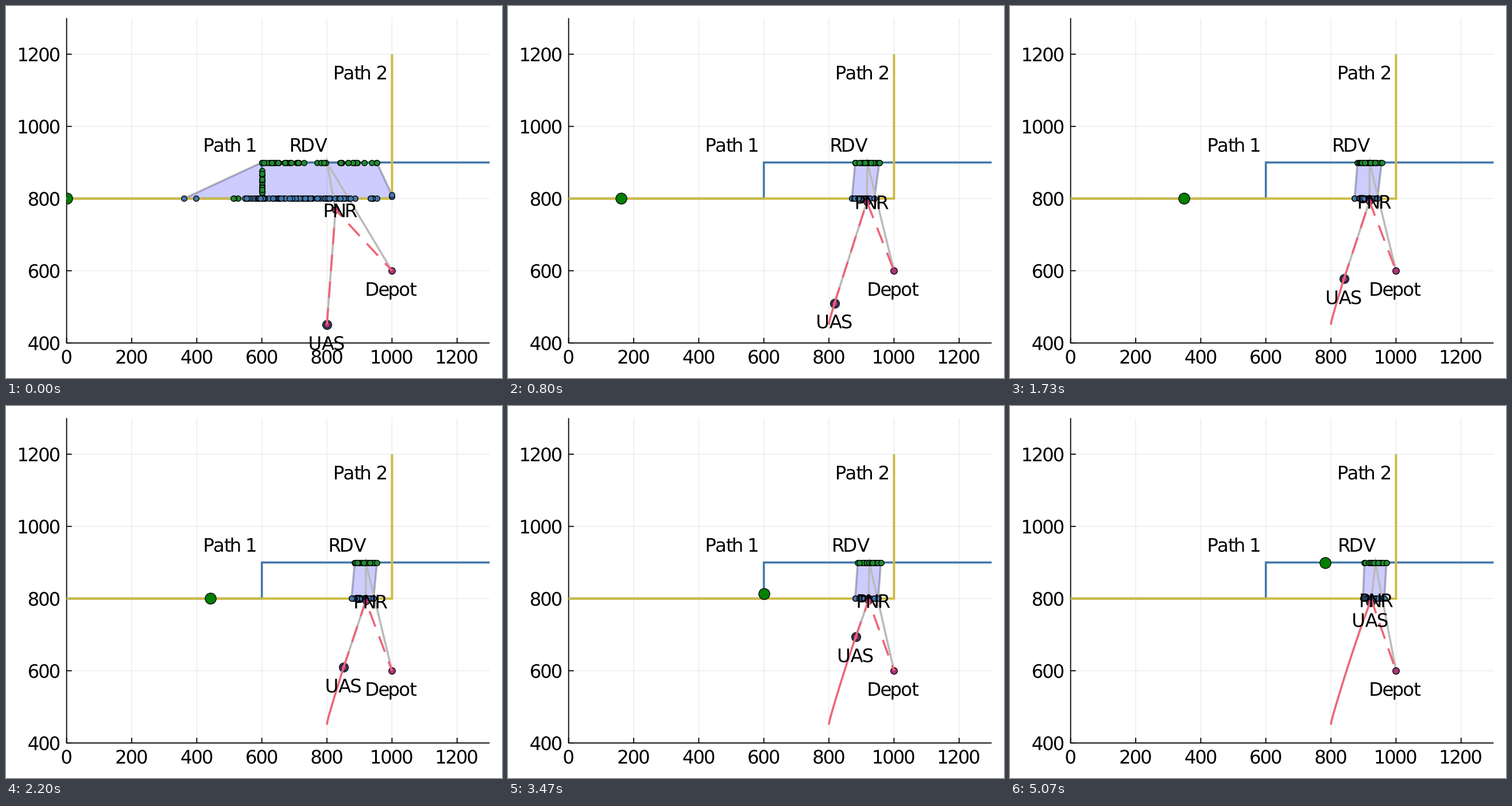
Write a matplotlib script that moves like this. It is 864x648 px and loops after 5.14 s.

```python
import numpy as np
import matplotlib.pyplot as plt
from matplotlib.animation import FuncAnimation
from matplotlib.patches import PathPatch, Polygon, Rectangle
from matplotlib.path import Path
from matplotlib.textpath import TextPath
from matplotlib.transforms import Affine2D

W, H, DPI = 864, 648, 100
PX = 72 / DPI
LEFT, RIGHT, TOP, BOTTOM = 105.6, 842.4, 21.1, 587
EM = 32.4
CAP = 0.729 * EM
BLUE, RED, GREEN = "#4477aa", "#ee6677", "#228833"
YELLOW, PURPLE, GRAY = "#ccbb44", "#aa3377", "#bbbbbb"

LOOP, TICK, STEPS = 5140, 20, 77
STARTS = np.round(np.arange(STEPS) * 20 / 3) * 10


def px(x, y):
    """Plot units to stage pixels."""
    return LEFT + np.asarray(x) * 0.5668, BOTTOM - (np.asarray(y) - 400) * 0.62885


fig = plt.figure(figsize=(W / DPI, H / DPI), dpi=DPI, facecolor="white")
ax = fig.add_axes([0, 0, 1, 1])
ax.set(xlim=(0, W), ylim=(H, 0))
ax.axis("off")


def line(x, y, color, width, z, **kw):
    kw = {"solid_capstyle": "butt", "solid_joinstyle": "miter"} | kw
    return ax.plot(x, y, color=color, lw=width * PX, zorder=z, snap=False, **kw)[0]


def dots(x, y, color, size, z):
    return ax.plot(x, y, "o", color=color, ms=size * PX, mec="black",
                   mew=1.3 * PX, zorder=z, snap=False)[0]


# --- text: each glyph starts at the pen, without its left bearing ---
def glyph(s):
    return TextPath((0, 0), s, size=EM, prop={"family": "DejaVu Sans"})


def right(s):
    return glyph(s).get_extents().x1


def shape(s):
    pen, parts, end = 0, [], 0
    bar = right("|")
    for c in s:
        step = right(c + "|") - bar
        if c != " ":
            g = glyph(c)
            box = g.get_extents()
            pen -= box.x0
            parts.append(Path(g.vertices + [pen, 0], g.codes))
            end = pen + box.x1
        pen += step
    path = Path.make_compound_path(*parts)
    return Path(path.vertices * [1, -1] + [0, CAP / 2], path.codes), end


class Label:
    def __init__(self, s, x=0, y=0, align=0.5):
        path, self.width = shape(s)
        self.align = align
        self.patch = ax.add_patch(PathPatch(path, fc="black", lw=0, zorder=20))
        self.move(x, y)

    def move(self, x, y):
        shift = Affine2D().translate(x - self.align * self.width, y)
        self.patch.set_transform(shift + ax.transData)


# --- axes ---
for v in range(0, 1201, 200):
    x, _ = px(v, 400)
    if v:
        line([x, x], [TOP, BOTTOM], "#e8e8e8", 1.2, 0)
    line([x, x], [BOTTOM, BOTTOM - 9], "black", 1.8, 1)
    Label(str(v), x, 611)
for v in range(400, 1201, 200):
    _, y = px(0, v)
    if v > 400:
        line([LEFT, RIGHT], [y, y], "#e8e8e8", 1.2, 0)
    line([LEFT, LEFT + 9], [y, y], "black", 1.8, 1)
    Label(str(v), 93, y + 0.5, 1)
line([LEFT, LEFT, RIGHT], [TOP, BOTTOM, BOTTOM], "black", 1.8, 1)

# --- fixed parts ---
line(*px([0, 600, 600, 1300], [800, 800, 900, 900]), BLUE, 3.6, 4)
line(*px([0, 1000, 1000], [800, 800, 1200]), YELLOW, 4, 5)
Label("Path 1", 390.5, 242)
Label("Path 2", 617.5, 116)
Label("Depot", 671.8, 493)
DEPOT = px(1000, 600)
dots(*DEPOT, PURPLE, 11.5, 9)

# --- motion ---
k = np.arange(STEPS)
part = k / k[-1]
settle = 1 - np.exp(-k / 2)

# The car slows down around the corner of path 1.
speed = np.where((k > 33) & (k <= 64), 9, 13.4)
drive = np.cumsum(speed) - speed[0]
car = np.c_[px(np.clip(drive, 0, 600) + np.clip(drive - 700, 0, None),
               800 + np.clip(drive - 600, 0, 100))]
uas = np.c_[558.9 + 0.92 * k - 1.1 * settle, 555.2 - 3.2 * k + 0.005 * k**2]
pnr = np.c_[574 + 50.5 * settle + 5 * part, 355 - 13.5 * settle - 4 * part]
rdv_x = 559 + 67 * settle + 10.5 * part**3

Y_TOP, Y_LOW = (float(px(0, v)[1]) for v in (900, 800))
X_BEND, X_END = (float(px(v, 0)[0]) for v in (600, 1000))


def row(x, y):
    return np.c_[x, np.full(len(x), y)]


def first_cloud(rng):
    """Wide opening spread, which also bends around the corners."""
    top = row(X_BEND + 200 * np.r_[0, rng.random(52) ** 1.7, 1], Y_TOP)
    side = np.c_[np.full(22, X_BEND), rng.uniform(Y_TOP + 9, Y_LOW, 22)]
    back = row(X_BEND - 50 * np.r_[rng.random(6) ** 3, 1], Y_LOW)
    low = row(np.r_[310, 331, rng.uniform(400, 440, 6), rng.uniform(440, 610, 75),
                    rng.uniform(610, 660, 7)], Y_LOW)
    bend = [(X_END, Y_LOW - 3), (X_END, Y_LOW - 6)]
    hull = [(310, Y_LOW), (X_BEND, Y_TOP), (646, Y_TOP), bend[1], (X_END, Y_LOW)]
    return np.r_[top, side, back], np.r_[low, bend], hull


def cluster(rng, mid, wide, y, n=34):
    half = 19.5 + rng.uniform(-2, 2) + wide
    spread = np.clip(rng.normal(0, 0.5, n), -1, 1)
    return row(mid + half * np.r_[-1, spread, 1], y)


def cloud(n):
    rng = np.random.default_rng(n + 5)
    if n == 0:
        return first_cloud(rng)
    wide = 70 * (1 - settle[n])
    green = cluster(rng, rdv_x[n], wide, Y_TOP)
    blue = cluster(rng, rdv_x[n] - 8 + 5 * part[n], wide, Y_LOW)
    return green, blue, [blue[0], green[0], green[-1], blue[-1]]


BLANK = [(0, 0)] * 3
edge = ax.add_patch(Polygon(BLANK, fill=False, ec=GRAY, lw=3.6 * PX, zorder=2))
area = ax.add_patch(Polygon(BLANK, fc=(0, 0, 1, 0.2), lw=0, zorder=3))
plan = line([], [], GRAY, 3.6, 6)
spike = ax.add_patch(Polygon(BLANK, fc=GRAY, lw=0, zorder=6))
greens = dots([], [], GREEN, 9.6, 7)
blues = dots([], [], BLUE, 9.6, 8)
pnr_dot = dots([], [], PURPLE, 11.5, 9)
uas_ring = dots([], [], BLUE, 15.8, 10)
uas_dot = dots([], [], PURPLE, 11, 11)
trail = line([], [], RED, 3.6, 12)
escape = line([], [], RED, 3.6, 12, linestyle=(0, (8, 5)), dash_capstyle="butt",
              dash_joinstyle="miter")
car_dot = dots([], [], "green", 19.2, 13)
frame = Rectangle((LEFT, TOP), RIGHT - LEFT, BOTTOM - TOP, transform=ax.transData)
car_dot.set_clip_path(frame)
rdv_label = Label("RDV", align=1)
pnr_label = Label("PNR")
uas_label = Label("UAS")


def update(i):
    n = np.searchsorted(STARTS, i * TICK + TICK / 2, "right") - 1
    u, p, x = uas[n], pnr[n], rdv_x[n]
    green, blue, hull = cloud(n)
    greens.set_data(*green.T)
    blues.set_data(*blue.T)
    edge.set_xy(hull)
    area.set_xy(hull)
    plan.set_data(*zip(u, p, (x, Y_TOP), DEPOT))
    spike.set_xy([(x - 1.9, Y_TOP), (x, Y_TOP - 10), (x + 1.9, Y_TOP)])
    escape.set_data(*zip(u, p, DEPOT))
    trail.set_data(*uas[:n + 1].T)
    for mark, at in ((pnr_dot, p), (uas_ring, u), (uas_dot, u), (car_dot, car[n])):
        mark.set_data(*at[:, None])
    rdv_label.move(x + 0.5, 242)
    pnr_label.move(p[0] + 9.5, p[1] + 1)
    uas_label.move(u[0], u[1] + 32)
    return []


anim = FuncAnimation(fig, update, frames=LOOP // TICK, interval=TICK,
                     init_func=lambda: [], repeat=True, repeat_delay=0)
plt.show()
```
